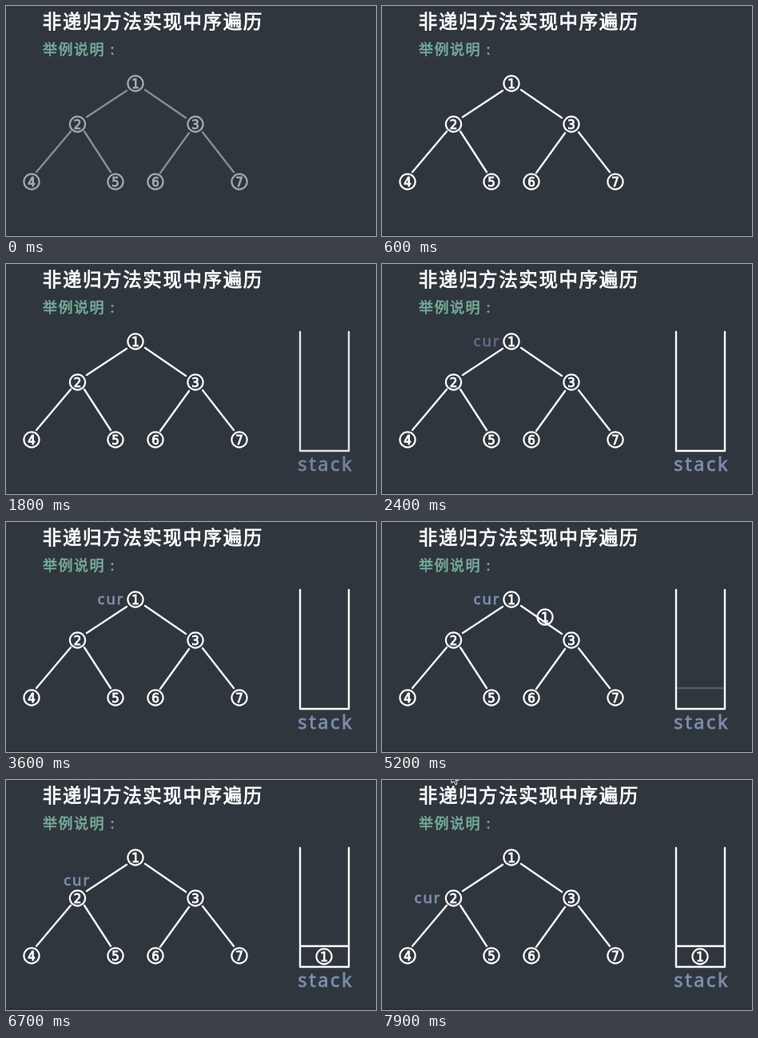
Write an HTML page that moves like this. It is 463 px wide and 288 px high and loops after 8 s.

```html
<!DOCTYPE html>
<html lang="zh-CN">
<head>
<meta charset="utf-8">
<style>
  html, body { margin: 0; width: 100%; height: 100%; overflow: hidden; background: #2f363e; }
  svg { display: block; width: 463px; height: 288px; }
  text { stroke-width: .8; }
  .cjk { font-family: "Noto Sans CJK SC", "Noto Sans CJK", sans-serif; }
  .title { font-size: 23.5px; letter-spacing: 1.6px; fill: #fff; stroke: #fff; }
  .sub { font-size: 18px; letter-spacing: 1.5px; fill: #78ad9a; stroke: #78ad9a; stroke-width: .6; }
  .label { font-family: "Noto Sans", sans-serif; fill: #7d8dab; stroke: #7d8dab; }
  .line { fill: none; stroke: #fafbfb; stroke-width: 2.4; stroke-linecap: round; stroke-linejoin: round; }
  .node circle { fill: none; stroke: #fafbfb; stroke-width: 2.2; }
  .node text { font: 15px "DejaVu Sans", sans-serif; text-anchor: middle; fill: #fafbfb; stroke: #fafbfb; stroke-width: 1; }
</style>
</head>
<body>
<svg viewBox="0 0 463 288">
  <rect y="286" width="463" height="2" fill="#2a3037"/>
  <text class="cjk title" x="45.8" y="27.6">非递归方法实现中序遍历</text>
  <text class="cjk sub" x="46" y="60.5">举例说明<tspan x="130.5">:</tspan></text>
  <path id="edges" class="line" d="M151 106L101 139M174 105L225 140M81 157L38 208M98 157L131 208M229 159L193 209M246 158L285 208"/>
  <g id="nodes"></g>
  <g id="stack">
    <path class="line" d="M368 85V234H429V85"/>
    <text class="label" x="365.3" y="258.5" font-size="23.5" letter-spacing="2.6">stack</text>
  </g>
  <path id="row" class="line" d="M368 208H429"/>
  <g id="cur"><text class="label" x="114.5" y="102.5" font-size="18.5" letter-spacing="2">cur</text></g>
  <g id="pushed"></g>
  <path id="pointer" d="M0 0V12L3 9.4L5 14L7 13L5 8.6H9Z" fill="#15181c" stroke="#fff" stroke-width="1"/>
</svg>
<script>
const LOOP = 8000;
const $ = id => document.getElementById(id);

const node = (n, x, y) =>
  `<g class="node" transform="translate(${x} ${y})"><circle r="9.6"/><text y="5.5">${n}</text></g>`;

const spots = [[162, 97], [89.5, 148], [237, 148], [32, 220], [137, 220], [187, 220], [292, 220]];
$('nodes').innerHTML = spots.map(([x, y], i) => node(i + 1, x, y)).join('');
$('pushed').innerHTML = node(1, 162, 97);

// Linear progress over half a second
const ramp = (t, start) => Math.min(1, Math.max(0, (t - start) / 500));
const fade = (id, p) => $(id).setAttribute('opacity', p);
const move = (id, x, y) => $(id).setAttribute('transform', `translate(${x} ${y})`);

function draw(t) {
  fade('nodes', ramp(t, -295));
  fade('edges', ramp(t, -220));
  fade('stack', ramp(t, 1360));
  fade('cur', ramp(t, 2100));

  const push = ramp(t, 5112);
  fade('row', push);
  fade('pushed', push > 0 ? 1 : 0);
  move('pushed', 236 * push, 124 * push);

  const step = ramp(t, 6415);
  move('cur', -74 * step, 51 * step);

  const enter = Math.min(1, (t - 7800) / 100);
  fade('pointer', enter >= 0 ? 1 : 0);
  move('pointer', 106 - 19 * enter, -10 + 2 * enter);
}

function tick() {
  draw(performance.now() % LOOP);
  requestAnimationFrame(tick);
}
tick();
</script>
</body>
</html>
```
